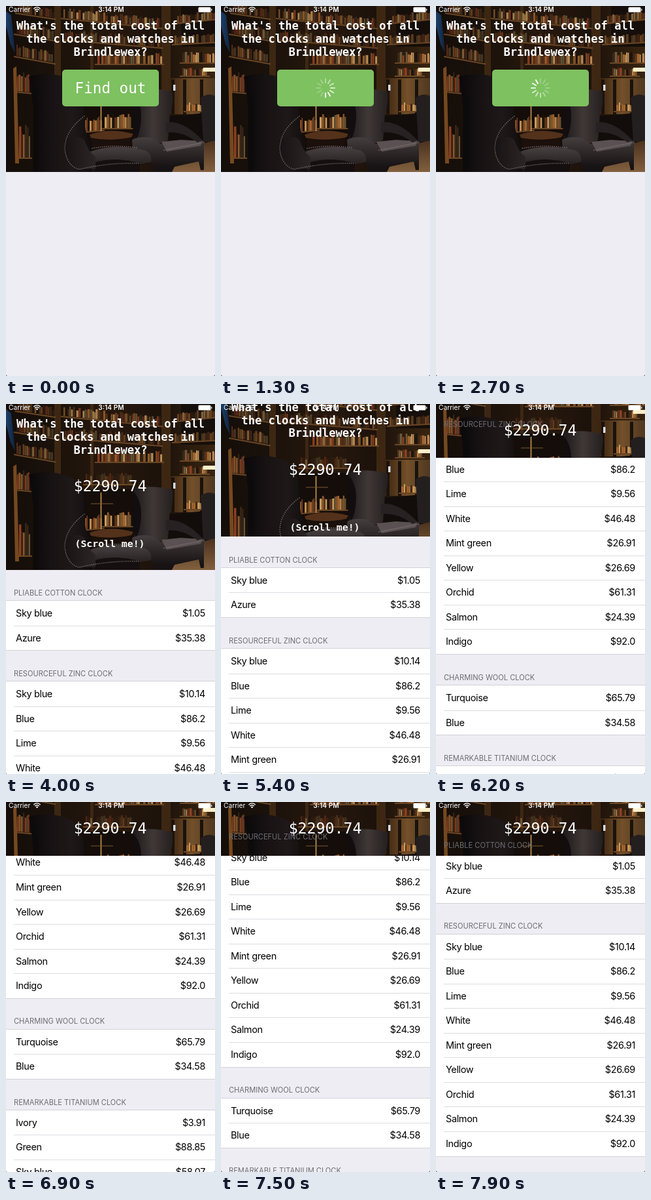
Recreate the animation shown at these times as an HTML page with a canvas. Size 320x564 px, loop 8 s.

```html
<!DOCTYPE html>
<html lang="en">
<head>
<meta charset="utf-8">
<title>Clock prices</title>
<style>
html, body { margin: 0; width: 100%; height: 100%; overflow: hidden; background: #555; }
#stage { position: relative; width: 320px; height: 564px; overflow: hidden; background: #efedf4;
  border-radius: 0 0 3px 3px; font-family: Inter, "Liberation Sans", sans-serif; color: #000; }
#stage > *, .mid { position: absolute; left: 0; width: 320px; }
.clip { top: 0; overflow: hidden; }
.clip > div { position: absolute; top: 0; width: 320px; height: 253px; }
#photo { z-index: 1; }
#caption { z-index: 3; color: #fff; font-family: "DejaVu Sans Mono", monospace; }
.mid { text-align: center; white-space: pre; }
#title { top: 21px; font: bold 17.1px/19.8px "DejaVu Sans Mono", monospace; }
#button { position: absolute; left: 85.5px; top: 97px; width: 148px; height: 55.5px; border-radius: 5px; background: #7ec160; }
#find { top: 97px; font-size: 22.6px; line-height: 56px; }
#total { left: -.5px; top: 97px; font-size: 23.2px; line-height: 56px; }
#hint { left: -1px; top: 203px; font-weight: bold; font-size: 14.8px; line-height: 20px; }
#caption svg { position: absolute; left: 139.5px; top: 105px; }
h2 { position: relative; z-index: 2; margin: 0; height: 18.3px; padding: 29.7px 0 0 12px;
  font: 11.1px/12px Inter, "Liberation Sans", sans-serif; color: #6d6d72; }
.rows { background: #fff; box-shadow: 0 -1px #d3d2d7, 0 1px #d3d2d7; }
.row { display: flex; justify-content: space-between; box-sizing: border-box; height: 37.55px; margin-left: 12px;
  padding: 0 15px 0 3px; font-size: 14.5px; line-height: 37.55px; letter-spacing: -.37px; }
.row + .row { border-top: 1px solid #dddce1; line-height: 36.5px; }
#status { z-index: 4; top: 0; height: 11px; color: #fff; font-size: 10.2px; line-height: 11px; }
#status svg { position: absolute; left: 0; top: 0; }
#status b { font-weight: 600; }
</style>
</head>
<body>
<div id="stage">
  <div id="list"></div>
  <div id="photo" class="clip"><div><canvas id="room" width="320" height="253"></canvas></div></div>
  <div id="caption" class="clip"><div>
    <div id="title" class="mid">What's the total cost of all
the clocks and watches in
Brindlewex?</div>
    <div id="button"></div>
    <div id="find" class="mid">Find out</div>
    <svg id="spinner" width="40" height="40" viewBox="-20 -20 40 40" stroke="#fff" stroke-width="2" stroke-linecap="round"></svg>
    <div id="total" class="mid">$2290.74</div>
    <div id="hint" class="mid">(Scroll me!)</div>
  </div></div>
  <div id="status">
    <span style="position:absolute;left:4px">Carrier</span>
    <b class="mid" style="left:1px">3:14 PM</b>
    <svg width="320" height="11" fill="none" stroke="#fff">
      <path d="M42.3 4.2Q47.5 -.4 52.7 4.2M44.2 6.2Q47.5 3.2 50.8 6.2" stroke-width="1.3"/>
      <path d="M45.6 7.6Q47.5 6 49.4 7.6L47.5 9.5Z" fill="#fff" stroke="none"/>
      <rect x="294.5" y="1.8" width="19" height="7.8" rx="1.6" fill="#fff" stroke="none"/>
      <path d="M314.8 4.2V7.2" stroke-width="1.2"/>
    </svg>
  </div>
</div>
<script>
const $ = id => document.getElementById(id);
const LOOP = 8000, TAP = 1200, LOADED = 3200, HEADER = 252.6, COMPACT = 82;

const sections = {
  'PLIABLE COTTON CLOCK': 'Sky blue 1.05,Azure 35.38',
  'RESOURCEFUL ZINC CLOCK': 'Sky blue 10.14,Blue 86.2,Lime 9.56,White 46.48,Mint green 26.91,' +
    'Yellow 26.69,Orchid 61.31,Salmon 24.39,Indigo 92.0',
  'CHARMING WOOL CLOCK': 'Turquoise 65.79,Blue 34.58',
  'REMARKABLE TITANIUM CLOCK': 'Ivory 3.91,Green 88.85,Sky blue 58.07'
};
$('list').innerHTML = Object.entries(sections).map(([name, items]) =>
  `<h2>${name}</h2><div class="rows">` + items.split(',').map(item => {
    const cut = item.lastIndexOf(' ');
    return `<div class="row"><span>${item.slice(0, cut)}</span><span>$${item.slice(cut + 1)}</span></div>`;
  }).join('') + '</div>').join('');

$('spinner').innerHTML = Array.from({ length: 12 }, (_, i) =>
  `<path d="M0 -8V-14" transform="rotate(${i * 30})"/>`).join('');
const spokes = [...$('spinner').children];

function paintRoom() {
  const c = $('room').getContext('2d');
  let seed = 11;
  const rnd = () => (seed = seed * 16807 % 2147483647) / 2147483647;
  const shape = (fill, d) => { c.fillStyle = fill; c.fill(new Path2D(d)); };
  const line = (color, width, d) => { c.strokeStyle = color; c.lineWidth = width; c.stroke(new Path2D(d)); };
  const fade = (x0, y0, x1, y1, ...colors) => {
    const g = c.createLinearGradient(x0, y0, x1, y1);
    colors.forEach((col, i) => g.addColorStop(i / (colors.length - 1), col));
    return g;
  };
  const covers = ['#8a5a2e', '#a5652e', '#5b321b', '#8f3f22', '#c99a5c', '#382718', '#6b5a3a', '#1c130d'];
  // A row of book spines standing on a board
  function shelf(x, y, width, height, slope = 0, glow = .8) {
    c.globalAlpha = glow;
    for (let dx = 0; dx < width;) {
      const w = 1.6 + rnd() * 2.6, h = height * (.65 + rnd() * .35);
      c.fillStyle = covers[rnd() * covers.length | 0];
      c.fillRect(x + dx, y + slope * dx - h, w - .4, h);
      dx += w;
    }
    c.globalAlpha = 1;
    line('#6b4624', 2, `M${x - 4} ${y + 1}l${width + 8} ${slope * (width + 8)}`);
  }

  shape(fade(0, 0, 320, 0, '#140d09', '#1b120b', '#27180d', '#1c120b', '#38240f'), 'M0 0H320V253H0Z');
  shape('#3d2713', 'M74 0H84V110H74ZM129 0H134V150H129ZM238 0H252V140H238Z');
  shape(fade(0, 0, 14, 0, '#1d3f68', '#10233c'), 'M0 8L8 14L14 72L7 58L0 30Z');
  shelf(18, 10, 54, 14, .15, .5);
  shelf(16, 42, 56, 17, .16, .5);
  shelf(16, 76, 56, 18, .18, .55);
  shelf(88, 18, 148, 15, .1, .8);
  shelf(90, 51, 146, 15, .08, .65);
  shelf(140, 88, 98, 17, 0, .9);
  shelf(122, 122, 72, 17, 0, .4);
  shelf(17, 130, 18, 32, .1, .9);
  shelf(20, 231, 16, 50, 0, 1);
  shape('#75491f', 'M11 95L16 92L20 240H14Z');

  // Right alcove
  shape('#150e0a', 'M268 0H320V62H268Z');
  shelf(262, 26, 58, 14, -.1, .6);
  shelf(258, 58, 62, 14, -.05, .6);
  shelf(270, 86, 50, 16, 0, 1);
  shelf(270, 106, 38, 13, 0, 1);
  shape('#fff0ca', 'M302 94H320V100H302Z');
  shape(fade(250, 0, 320, 0, '#392310', '#73502a', '#4f3820'), 'M250 110H320V165H250Z');
  shape('#1b120c', 'M253 112H258V165H253ZM271 112H276V165H271ZM297 112H302V165H297Z');
  shelf(276, 160, 28, 13, 0, 1);
  shape('#d7dce2', 'M256 120H259.5V129H256Z');
  shape('#120d0b', 'M246 168L320 162V215H246Z');
  shape('#241f1f', 'M298 140Q309 132 320 137V207H302Z');
  shape(fade(0, 205, 0, 253, '#4b321e', '#82603f'), 'M250 222L320 205V253H240Z');

  // Lamp, side table and the books beyond it
  shape('#140d09', 'M112 130H196V225H112Z');
  shelf(119, 192, 28, 22, -.1, 1);
  shelf(151, 186, 40, 22, 0, 1);
  line('#b98c4c', 1.8, 'M145.5 135V191');
  line('#7d5b32', 1, 'M130 152H164');
  shape('#54311a', 'M128 196Q160 185 195 195L192 200Q160 207 130 201Z');
  shape('#1b100b', 'M132 202Q160 209 190 201V218H132Z');

  // Right armchair
  shape(fade(190, 0, 260, 0, '#191415', '#3f3837', '#211b1b'),
    'M190 130Q222 122 255 131Q257 148 251 164L248 205L222 214L196 202Q202 170 190 130Z');
  shape('#120e0f', 'M190 130Q206 140 207 166Q207 190 199 204L194 190Q199 162 190 130Z');
  shape(fade(0, 200, 0, 245, '#453e3f', '#171213'),
    'M193 204Q204 198 222 201L236 210L300 204Q305 207 303 216L303 250H298L295 237L258 245L254 253H226L221 232L194 222Z');
  shape('#5a5252', 'M238 207L268 204L300 206L298 213L246 222Z');
  shape('#272122', 'M245 177Q272 174 301 205L293 208Q270 190 245 193Z');

  // Left armchair
  shape(fade(35, 0, 135, 0, '#0b0809', '#171213', '#1e1819', '#0f0c0c'),
    'M35 108Q60 99 88 108Q108 113 115 128Q121 148 119 170Q122 202 135 222L137 253H41V200Q44 145 35 108Z');
  shape('#0d0a0b', 'M35 108Q49 120 50 160L49 253H41V200Q44 145 35 108Z');
  shape(fade(0, 213, 0, 253, '#4a4344', '#181314'),
    'M124 224Q162 208 213 220Q224 225 222 238L206 241L200 253H133Z');
  shape('#15100f', 'M137 238Q170 229 205 240V253H135Z');
  shape(fade(88, 0, 137, 0, '#171213', '#2b2526'),
    'M88 206Q108 194 120 204Q126 222 137 230V248L108 249Q91 234 88 206Z');
  c.lineCap = 'round';
  c.setLineDash([.1, 3]);
  line('#8f8580', 1.4, 'M120 168Q90 190 90 218Q93 244 112 249Q160 238 205 240M132 217Q165 211 200 216M303 208L241 220');
  c.setLineDash([]);
}
paintRoom();

// Scroll offset over time: [ms, px]
const path = [[5100, 0], [5400, 50], [5700, 205], [6200, 380], [6600, 443], [6900, 462.5], [7050, 463],
  [7300, 430], [7600, 320], [7900, 222], [8000, 200]];
function scrollAt(t) {
  const i = path.findIndex(p => p[0] > t);
  if (i < 1) return i ? path.at(-1)[1] : 0;
  const slope = k => k < 1 || k > path.length - 2 ? 0 :
    (path[k + 1][1] - path[k - 1][1]) / (path[k + 1][0] - path[k - 1][0]);
  const [t0, y0] = path[i - 1], [t1, y1] = path[i], span = t1 - t0, u = (t - t0) / span, v = 1 - u;
  return v * v * (1 + 2 * u) * y0 + u * u * (3 - 2 * u) * y1 +
    span * u * v * (v * slope(i - 1) - u * slope(i));
}

const show = (id, on) => $(id).style.visibility = on ? 'visible' : 'hidden';
const start = performance.now();
function draw() {
  const t = (performance.now() - start) % LOOP;
  const loaded = t >= LOADED, loading = t >= TAP && !loaded;
  show('button', !loaded);
  show('find', t < TAP);
  show('spinner', loading);
  for (const id of ['list', 'total', 'hint']) show(id, loaded);

  const head = Math.floor(t * 12 / 1000) + 3;
  spokes.forEach((s, i) => s.style.opacity = Math.max(.25, 1 - (head - i + 12) % 12 * .1));

  const y = scrollAt(t), height = Math.max(COMPACT, HEADER - y);
  $('list').style.top = HEADER - .3 - y + 'px';
  for (const id of ['photo', 'caption']) {
    $(id).style.height = height + 'px';
    $(id).firstElementChild.style.top = (height - HEADER) / 2 + 'px';
  }
  requestAnimationFrame(draw);
}
draw();
</script>
</body>
</html>
```
